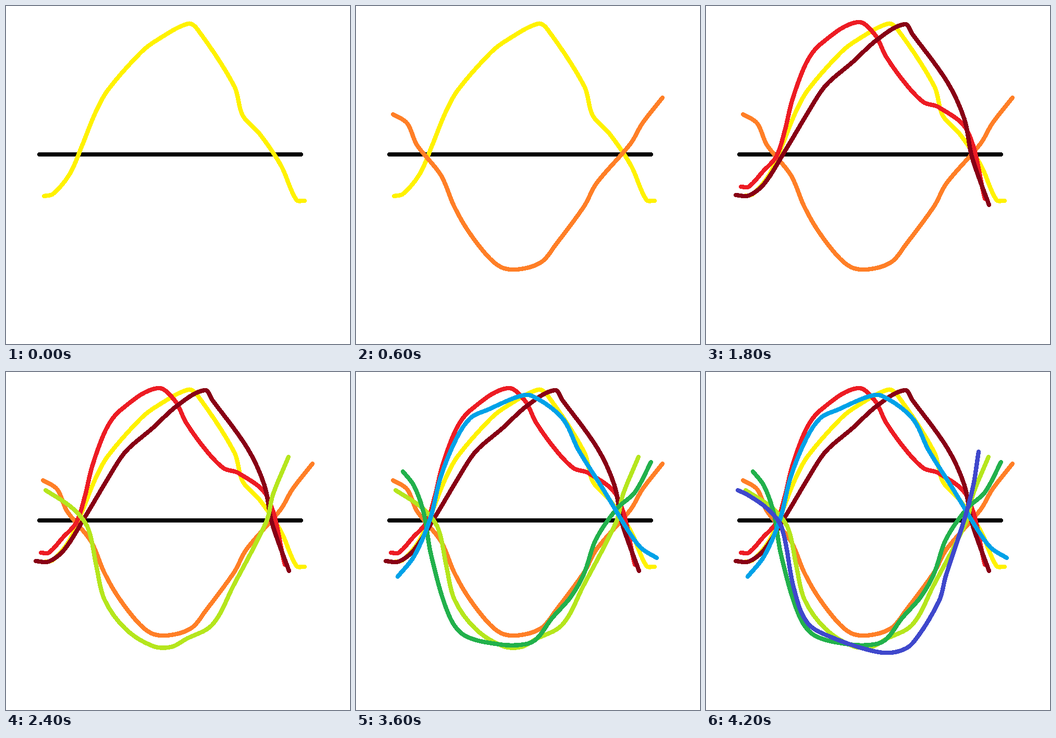
These frames come from a looping animation (660 px wide and 649 px high, 4800 ms). An HTML page:

```html
<!DOCTYPE html>
<html lang="en">
<head>
<meta charset="utf-8">
<title>Curves</title>
<style>
  @property --step { syntax: "<number>"; inherits: true; initial-value: 0; }
  @keyframes build { from { --step: 0; } to { --step: 8; } }
  html, body { margin: 0; width: 100%; height: 100%; overflow: hidden; background: #fff; }
  svg {
    display: block; width: 660px; height: 649px;
    fill: none; stroke-width: 8; stroke-linecap: round; stroke-linejoin: round;
    shape-rendering: crispEdges;
    animation: build 4800ms steps(8, end) infinite;
  }
  /* opacity clamps to 0..1, so each curve appears at its own step */
  .curve { stroke-width: 8.4px; opacity: calc(var(--step) - var(--i) + 1); }
</style>
</head>
<body>
<svg id="stage" viewBox="0 0 660 649">
  <path d="M64 285H566" stroke="#000"/>
</svg>
<script>
// Key points of each hand-drawn stroke: ends, bends and crests
const curves = {
  '#fff200': '73,365 90,361 122,323 146,268 171,206 195,162 260,88 292,64 349,34 366,43 438,154 454,210 487,246 528,307 557,372 573,374',
  '#ff7f27': '71,208 98,225 117,267 163,325 188,384 216,433 257,485 285,504 323,504 358,490 382,460 438,384 461,341 527,264 549,226 588,176',
  '#ed1c24': '67,347 82,347 109,318 135,289 151,240 166,179 193,108 220,73 290,31 324,55 346,98 386,153 418,185 446,194 501,239 535,370',
  '#880015': '57,363 82,364 112,341 150,281 216,171 236,146 281,108 328,65 381,35 396,54 463,146 496,218 510,289 543,382',
  '#b5e61d': '76,227 127,261 157,299 173,371 189,437 229,493 281,526 317,528 345,513 396,485 436,411 500,286 512,236 542,163',
  '#22b14c': '90,191 111,218 130,271 144,351 177,464 207,505 275,523 323,523 347,512 375,474 412,432 438,386 460,322 500,263 535,231 566,173',
  '#00a2e8': '80,393 112,353 143,280 162,203 193,127 220,88 254,72 312,47 338,46 396,89 427,150 476,228 523,306 547,338 577,357',
  '#3f48cc': '61,227 80,236 116,261 145,298 168,413 195,482 245,511 326,537 367,537 397,520 447,440 460,392 496,282 513,217 523,153'
};

// Spline whose tangents follow the chord between neighbouring points
function smooth(text) {
  const pts = text.split(' ').map(p => p.split(',').map(Number));
  const at = i => pts[Math.max(0, Math.min(pts.length - 1, i))];
  const dist = (a, b) => Math.hypot(b[0] - a[0], b[1] - a[1]);
  const handle = (p, from, to, len) => {
    const k = len / 3 / dist(from, to);
    return p.map((v, n) => v + (to[n] - from[n]) * k);
  };
  return pts.slice(1).reduce((d, b, i) => {
    const a = at(i), len = dist(a, b);
    return `${d}C${handle(a, at(i - 1), b, len)} ${handle(b, at(i + 2), a, len)} ${b}`;
  }, `M${pts[0]}`);
}

const stage = document.getElementById('stage');
Object.entries(curves).forEach(([color, text], i) => {
  const path = document.createElementNS(stage.namespaceURI, 'path');
  path.setAttribute('class', 'curve');
  path.setAttribute('d', smooth(text));
  path.setAttribute('stroke', color);
  path.style.setProperty('--i', i);
  stage.append(path);
});
</script>
</body>
</html>
```
